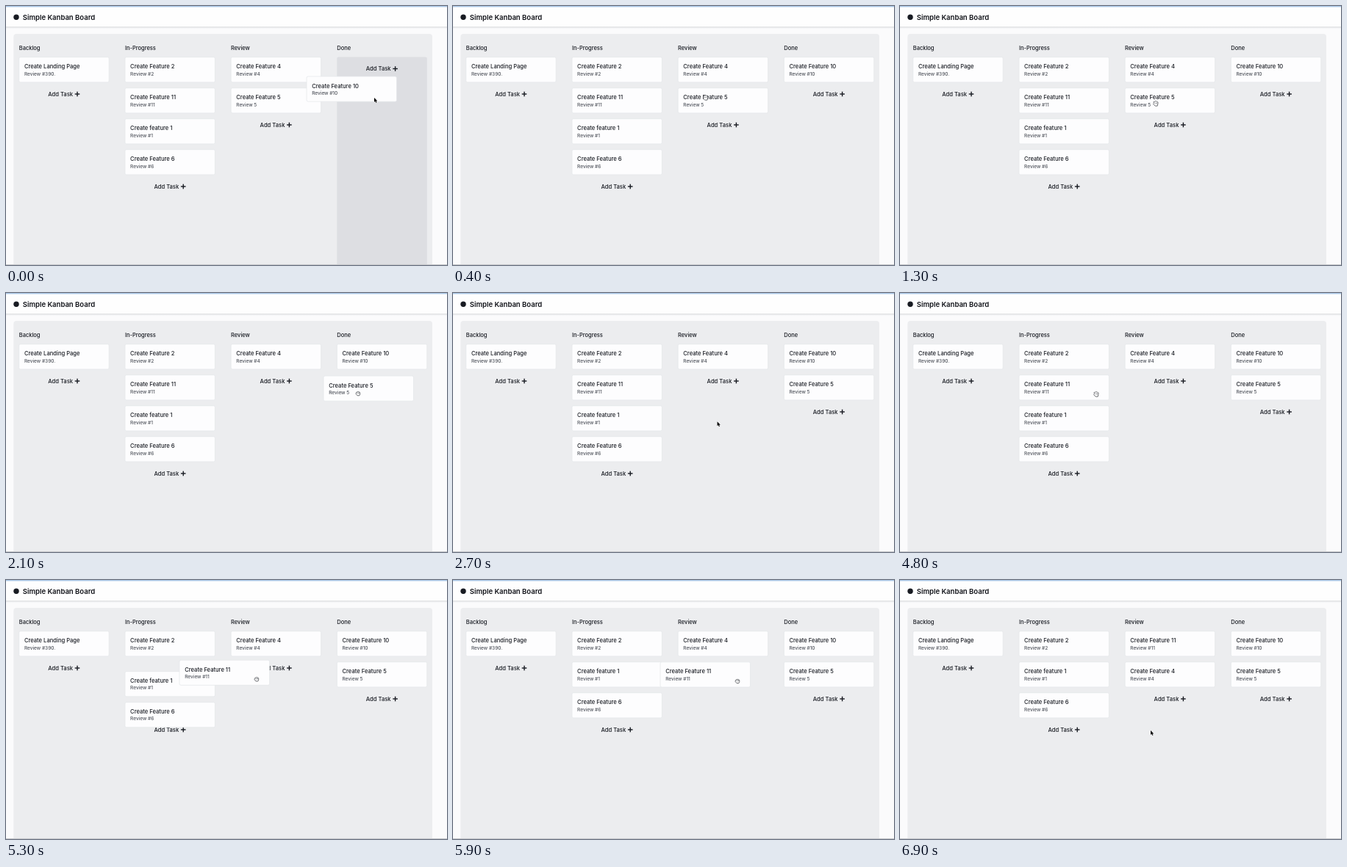
Recreate the animation shown at these times as an HTML page with a canvas. Size 600x353 px, loop 7 s.

```html
<!DOCTYPE html>
<html lang="en">
<head>
<meta charset="utf-8">
<title>Simple Kanban Board</title>
<style>
html, body { margin: 0; width: 100%; height: 100%; overflow: hidden; background: #fbfbfc; }
canvas { display: block; width: 600px; height: 353px; }
</style>
</head>
<body>
<canvas id="stage"></canvas>
<script>
const LOOP = 7000, STEP = 100, DROP = 400, SHIFT = 500;
const CARD_W = 122.5, CARD_H = 34.2, ROW = 42;
const NAMES = ['Backlog', 'In-Progress', 'Review', 'Done'];
const INK = '#181b22';
const canvas = document.getElementById('stage');
const ctx = canvas.getContext('2d');
const dpr = window.devicePixelRatio || 1;
canvas.width = 600 * dpr;
canvas.height = 353 * dpr;
ctx.scale(dpr, dpr);

const colX = col => 17.7 + 144.2 * col;
const slot = (col, row) => [colX(col), 69.7 + ROW * row];
const ease = u => 1 - (1 - Math.min(1, Math.max(0, u))) ** 2.3;
const mix = (a, b, k) => a.map((v, i) => v + (b[i] - v) * k);

// shift: when a card slides, and by how many rows.
// drag: grip is where the pointer holds the card, to is the column and row it lands in.
const cards = [
  { title: 'Create Landing Page', sub: 'Review #390.', at: [0, 0] },
  { title: 'Create Feature 2', sub: 'Review #2', at: [1, 0] },
  { title: 'Create feature 1', sub: 'Review #1', at: [1, 2], shift: { start: 5100, rows: -1 } },
  { title: 'Create Feature 6', sub: 'Review #6', at: [1, 3], shift: { start: 5100, rows: -1 } },
  { title: 'Create Feature 4', sub: 'Review #4', at: [2, 0], shift: { start: 5900, rows: 1 } },
  { title: 'Create Feature 10', sub: 'Review #10', at: [3, 0],
    drag: { grab: -1, release: 0, grip: [92, 29], to: [3, 0] } },
  { title: 'Create Feature 5', sub: 'Review 5', at: [2, 1],
    drag: { grab: 1400, release: 2300, grip: [47, 24], to: [3, 1] } },
  { title: 'Create Feature 11', sub: 'Review #11', at: [1, 1],
    drag: { grab: 4900, release: 6100, grip: [105, 26], to: [2, 0] } }
];

// Pointer moves: start, end, where to, and how far the path bows downwards.
const moves = [
  [0, 600, [330, 125], 0],
  [600, 1200, [348, 133], -20],
  [1400, 2100, [479, 137], -22],
  [2300, 3500, [282, 144], 36],
  [4500, 4800, [267, 138], 0],
  [4900, 6100, [389, 138], -3],
  [6500, 6900, [341, 205], 0]
];

function pointer(t) {
  let spot = [501, 125];
  for (const [start, end, to, bow] of moves) {
    if (t <= start) break;
    const k = ease((t - start) / (end - start));
    spot = mix(spot, to, k);
    spot[1] += bow * Math.sin(Math.PI * k);
  }
  return spot;
}

function place({ at, shift, drag }, t) {
  const [x, y] = slot(...at);
  if (shift) return [x, y + shift.rows * ROW * ease((t - shift.start) / SHIFT)];
  if (!drag || t <= drag.grab) return [x, y];
  const held = pointer(Math.min(t, drag.release)).map((v, i) => v - drag.grip[i]);
  return mix(held, slot(...drag.to), ease((t - drag.release) / DROP));
}

const isHeld = ({ drag }, t) => drag && t > drag.grab && t < drag.release;
const isDropping = ({ drag }, t) => drag && t >= drag.release && t < drag.release + DROP;
const isLifted = (c, t) => isHeld(c, t) || isDropping(c, t);

// Number of cards above each "Add Task".
const counts = t => [
  1,
  t < 5200 ? 4 : 3,
  t >= 1800 && t < 6500 ? 1 : 2,
  t < 400 ? 0 : t < 2700 ? 1 : 2
];

function text(str, x, y, size, color = INK, weight = 450) {
  ctx.font = `${weight} ${size}px Inter, sans-serif`;
  ctx.fillStyle = color;
  ctx.fillText(str, x, y);
}

function rect(x, y, w, h, color) {
  ctx.fillStyle = color;
  ctx.fillRect(x, y, w, h);
}

function box(x, y, w, h, r, fill, line) {
  ctx.beginPath();
  ctx.roundRect(x, y, w, h, r);
  ctx.fillStyle = fill;
  ctx.fill();
  if (!line) return;
  ctx.strokeStyle = line;
  ctx.lineWidth = 0.7;
  ctx.stroke();
}

function addTask(x, y) {
  text('Add Task', x + 39.5, y + 2.8, 7.6);
  rect(x + 76, y - 0.7, 6.6, 1.4, INK);
  rect(x + 78.6, y - 3.3, 1.4, 6.6, INK);
}

function card({ title, sub }, [x, y]) {
  box(x, y, CARD_W, CARD_H, 2, '#fdfdfe', '#e3e5e8');
  text(title, x + 7.2, y + 15.5, 7.6);
  text(sub, x + 7.2, y + 24.8, 6.5, '#50545c');
}

function arrow() {
  const path = new Path2D('M0 0V6L1.4 4.8 2.4 7 3.4 6.6 2.4 4.5 4.3 4.4Z');
  ctx.lineWidth = 1;
  ctx.strokeStyle = '#fff';
  ctx.stroke(path);
  ctx.fillStyle = '#000';
  ctx.fill(path);
}

function hand(closed) {
  const path = new Path2D(closed
    ? 'M-2.6 -1Q-1.8 -2.6 -.8 -2.2 .2 -2.8 1 -2.2 2.7 -2.2 2.7 -.5V.8L1.8 2.8H-1L-2.9 .6Z'
    : 'M-2.6 -.4L-3 -2.2Q-2.4 -3.4 -1.6 -2.6 -.8 -4 .2 -3 1.4 -3.6 1.9 -2.4 3.3 -2.4 3 -.6L2.2 3.2H-.8L-3.4 .6Z');
  ctx.fillStyle = '#fff';
  ctx.fill(path);
  ctx.strokeStyle = '#33363c';
  ctx.lineWidth = 0.7;
  ctx.stroke(path);
  ctx.lineWidth = 0.5;
  ctx.stroke(new Path2D('M-1 -1.2V.2M.3 -1.2V.2M1.5 -1.2V.2'));
}

function drawPointer(t) {
  const [px, py] = pointer(t);
  const held = cards.some(c => isHeld(c, t));
  const dropping = cards.some(c => isDropping(c, t));
  const over = cards.some(c => {
    const [x, y] = place(c, t);
    return px > x && px < x + CARD_W && py > y && py < y + CARD_H;
  });
  ctx.save();
  ctx.translate(px, py);
  if (held || (over && !dropping)) hand(held);
  else arrow();
  ctx.restore();
}

function draw(t) {
  rect(0, 0, 600, 353, '#fbfbfc');
  rect(0, 0, 600, 28, '#fefefe');
  rect(0, 0, 600, 1.4, '#a9c6e6');
  const shade = ctx.createLinearGradient(0, 28, 0, 31);
  shade.addColorStop(0, '#dcdde0');
  shade.addColorStop(1, '#fbfbfc');
  rect(0, 28, 600, 3, shade);
  box(10.3, 11.6, 7.4, 7.4, 3.7, INK);
  text('Simple Kanban Board', 22.8, 18.7, 9.5, '#101218', 600);

  box(10.3, 38, 569.7, 325, 4, '#ecedef');
  const glow = 1 - ease(t / DROP);
  box(colX(3), 69.5, CARD_W, 290, 2, `rgba(221,222,226,${glow})`);
  counts(t).forEach((n, col) => {
    text(NAMES[col], colX(col), 59.8, 7.5);
    addTask(colX(col), Math.max(85.5, 78 + ROW * n));
  });

  // Lifted cards lie on top of the others.
  for (const lifted of [false, true])
    for (const c of cards)
      if (!!isLifted(c, t) === lifted) card(c, place(c, t));

  rect(0, 352, 600, 1, '#c9cacd');
  drawPointer(t);
}

const start = performance.now();
function frame() {
  const t = (performance.now() - start) % LOOP;
  draw(Math.floor(t / STEP) * STEP);
  requestAnimationFrame(frame);
}
frame();
</script>
</body>
</html>
```
